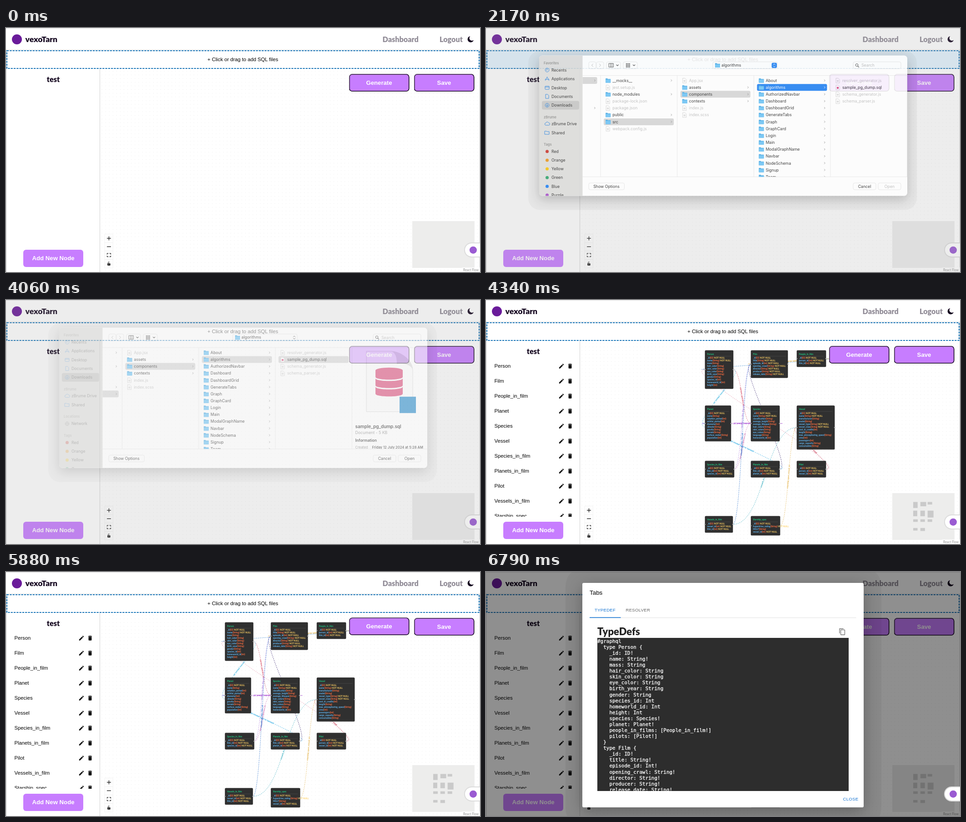
Recreate the animation shown at these times as an HTML page. Size 1043x537 px, loop 8 s.

```html
<!DOCTYPE html>
<html lang="en">
<head>
<meta charset="utf-8">
<title>Schema editor</title>
<style>
html, body { margin: 0; width: 100%; height: 100%; overflow: hidden; background: #fff; }
svg { display: block; width: 1043px; height: 537px; }
text { white-space: pre; }
.ui { font: 11.25px "Liberation Sans", Arial, sans-serif; }
.btn { font: bold 13.2px "Liberation Sans", Arial, sans-serif; fill: #fff; text-anchor: middle; }
.brand { font: 900 16.2px Lato, sans-serif; fill: #14061f; }
.mac { font: 8.75px Inter, sans-serif; fill: #2b2b2b; }
.head { font: 600 7.5px Inter, sans-serif; fill: #8f8f8d; }
.node { font: bold 4.86px Lato, sans-serif; }
.edge { fill: none; stroke-width: .9; stroke-dasharray: 2.03; }
.tab { font: 9.6px "Liberation Sans", Arial, sans-serif; letter-spacing: .27px; }
.code { font: 10.97px "DejaVu Sans Mono", monospace; fill: #fff; stroke: #fff; stroke-width: .3px; }
.line { fill: none; stroke-linecap: round; stroke-linejoin: round; }
.sheet { filter: drop-shadow(0 8px 12px rgba(0,0,0,.22)); }
.paper { filter: drop-shadow(0 9px 18px rgba(0,0,0,.28)); }
</style>
</head>
<body>
<svg id="stage" viewBox="0 0 1043 537"></svg>
<script>
const rect = (x, y, w, h, fill, rx = 0, more = '') =>
  `<rect x="${x}" y="${y}" width="${w}" height="${h}" rx="${rx}" fill="${fill}" ${more}/>`;
const text = (x, y, s, cls, more = '') => `<text x="${x}" y="${y}" class="${cls}" ${more}>${s}</text>`;
const path = (d, fill, more = '') => `<path d="${d}" fill="${fill}" ${more}/>`;
const line = (d, stroke, width = 1, more = '') =>
  `<path class="line" d="${d}" stroke="${stroke}" stroke-width="${width}" ${more}/>`;
const circle = (x, y, r, fill, more = '') => `<circle cx="${x}" cy="${y}" r="${r}" fill="${fill}" ${more}/>`;
const group = (id, body, more = '') => `<g id="${id}" ${more}>${body}</g>`;
const icon = (d, x, y, scale, fill = '#111') =>
  path(d, fill, `transform="translate(${x - 12 * scale} ${y - 12 * scale}) scale(${scale})"`);
const clip = (id, x, y, w, h, rx) => `<clipPath id="${id}">${rect(x, y, w, h, '#000', rx)}</clipPath>`;

const PURPLE = '#c77dff', INK = '#14061f';
const PENCIL = 'M3 17.25V21h3.75L17.8 9.95l-3.75-3.75zM20.7 7.05a1 1 0 0 0 0-1.4l-2.35-2.35a1 1 0 0 0-1.4 0l-1.85 1.85 3.75 3.75z';
const TRASH = 'M6 19a2 2 0 0 0 2 2h8a2 2 0 0 0 2-2V7H6zM19 4h-3.5l-1-1h-5l-1 1H5v2h14z';
const COPY = 'M16 1H4a2 2 0 0 0-2 2v14h2V3h12zM19 5H8a2 2 0 0 0-2 2v14a2 2 0 0 0 2 2h11a2 2 0 0 0 2-2V7a2 2 0 0 0-2-2zm0 16H8V7h11z';

// Tables: name, column, row, width, fields (# = Int, ! = NOT NULL)
const tables = [
  ['Person', 0, 0, 62, 'name! mass hair_color skin_color eye_color birth_year gender species_id# homeworld_id# height#'],
  ['Film', 1, 0, 81, 'title! episode_id#! opening_crawl! director! producer! release_date!'],
  ['People_in_film', 2, 0, 64, 'person_id#! film_id#!'],
  ['Planet', 0, 1, 57, 'name rotation_period# orbital_period# diameter# climate gravity terrain surface_water population#'],
  ['Species', 1, 1, 63, 'name! classification average_height average_lifespan hair_colors skin_colors eye_colors language homeworld_id#'],
  ['Vessel', 2, 1, 83, 'name! manufacturer model vessel_type! vessel_class! cost_in_credits# length max_atmosphering_speed crew# passengers# cargo_capacity consumables'],
  ['Species_in_film', 0, 2, 64, 'film_id#! species_id#!'],
  ['Planets_in_film', 1, 2, 63, 'film_id#! planet_id#!'],
  ['Pilot', 2, 2, 64, 'person_id#! vessel_id#!'],
  ['Vessels_in_film', 0, 3, 61, 'vessel_id#! film_id#!'],
  ['Starship_spec', 1, 3, 64, 'hyperdrive_rating! MGLT vessel_id#!']
].map(([name, col, row, w, list]) => {
  const fields = ('_id! ' + list).split(' ');
  return { name, fields, w, x: 482 + 101 * col, y: 111 + 121.6 * row, h: 18 + 6.02 * fields.length };
});

const links = [
  [0, 4, '#d9566b'], [0, 3, '#45b8e0'], [2, 0, '#3f8fd6'], [2, 1, '#e3b34c'], [4, 3, '#a23fd0'],
  [6, 1, '#b58be0'], [6, 4, '#d07bb8'], [7, 1, '#33206e'], [7, 3, '#3fb2e6'], [8, 0, '#e79ab0'],
  [8, 5, '#cc4a62'], [9, 1, '#3478d0'], [9, 5, '#45b3c4'], [10, 5, '#e6b95a']
];

function tableBox(n) {
  const rows = n.fields.map((f, i) => {
    const name = f.replace(/[#!]/g, '');
    const type = i ? (f.includes('#') ? 'Int' : 'String') : 'ID';
    const must = f.includes('!') ? '<tspan fill="#ffd166"> NOT NULL</tspan>' : '';
    return text(n.x + 4.5, n.y + 18 + 6.02 * i, `${name}<tspan fill="#ff7043">(${type})</tspan>${must}`, 'node', 'fill="#64b9f5"');
  }).join('');
  const mid = n.y + n.h / 2;
  const handle = x => circle(x, mid, 1.2, '#fff', 'stroke="#333" stroke-width=".5"');
  return rect(n.x, n.y, n.w, n.h, '#303030', 1.5, 'stroke="#1c1c1c" stroke-width=".6"') +
    text(n.x + 4.5, n.y + 9.6, n.name, 'node', 'fill="#20c782"') +
    line(`M${n.x + 4} ${n.y + 12.6}h${n.w - 9}`, '#555', .5) + rows + handle(n.x) + handle(n.x + n.w);
}

function edge([from, to, color], i) {
  const a = tables[from], b = tables[to];
  const x = a.x + a.w, y = a.y + a.h / 2, ty = b.y + b.h / 2, dx = b.x - x;
  const off = dx >= 0 ? dx / 2 : 3.98 * Math.sqrt(-dx);
  const label = a.name.toLowerCase() + '_' + b.name.toLowerCase() + '_id';
  return `<path id="edge${i}" class="edge" stroke="${color}" d="M${x} ${y}C${x + off} ${y} ${b.x - off} ${ty} ${b.x} ${ty}"/>` +
    `<text class="node" fill="${color}" text-anchor="middle" dy="1.5"><textPath href="#edge${i}" startOffset="50%">${label}</textPath></text>`;
}

const bigButton = (x, label) =>
  rect(x + .75, 102, 131, 37, PURPLE, 6, `stroke="${INK}" stroke-width="1.6"`) +
  line(`M${x + .75} 136V108a6 6 0 0 1 6-6h121`, '#5a4468', 1.4) + text(x + 66, 124.8, label, 'btn');

function page() {
  const list = tables.map((n, i) => {
    const y = 145 + 33 * i;
    return text(18.5, y + 4, n.name, 'ui') + icon(PENCIL, 166, y + .5, .58) + icon(TRASH, 185, y + .5, .58);
  }).join('');
  const map = tables.map(n =>
    rect(940 + (n.x - 482) * .157, 444.5 + (n.y - 111) * .157, n.w * .157, n.h * .157, '#cacaca')).join('');
  const controls = [0, 1, 2, 3].map(i => rect(217, 453.7 + 18.6 * i, 18.6, 18.6, '#fefefe', 0, 'stroke="#eee" stroke-width=".7"')).join('') +
    line('M222.5 462.8h8M226.5 458.8v8M222.5 481.3h8', '#111', 1.2) +
    line('M222.5 498v-2h2.5M228 496h2.5v2M230.5 501.5v2h-2.5M225 503.5h-2.5v-2', '#111', 1.1) +
    rect(223.3, 518, 6.2, 4.8, '#111', .8) + line('M224.7 518v-1.5a1.5 1.5 0 0 1 2.9-.6', '#111', 1) +
    circle(226.4, 520.4, .8, '#fff');
  return rect(0, 0, 1043, 537, '#fff') +
    rect(207, 91, 836, 446, 'url(#dots)') +
    line('M0 .5h1043M0 48h1043', '#dedede', 1.2) + line('M.7 48v489M206.5 91v446M1042.3 48v489', '#d8d8d8', 1.2) +
    circle(24, 25, 11, '#6a1b9a') + text(42.5, 31, 'vexoTarn', 'brand', 'style="font-size:17.6px"') +
    text(828.5, 30.5, 'Dashboard', 'brand', 'style="fill:#908b96"') + text(954, 30.5, 'Logout', 'brand', 'style="fill:#908b96"') +
    path('M1021.5 18A6.8 6.8 0 1 0 1029 26.5A5.6 5.6 0 0 1 1021.5 18Z', INK) +
    rect(1, 50, 1040, 40, '#e3f2fd', 0, 'id="hover"') +
    rect(2, 50, 1039, 39, 'none', 0, 'stroke="#1976b8" stroke-width="2" stroke-dasharray="4.2 2.1"') +
    text(521, 73, '+ Click or drag to add SQL files', 'ui', 'text-anchor="middle"') +
    text(104, 119, 'test', 'brand', 'text-anchor="middle"') +
    rect(38, 488, 132, 38, PURPLE, 6) + text(104, 511, 'Add New Node', 'btn') +
    rect(894, 425, 137, 103, '#ededec') +
    group('data', `<g clip-path="url(#listClip)">${list}</g>` + links.map(edge).join('') + tables.map(tableBox).join('') + map) +
    controls + group('generate', bigButton(755, 'Generate')) + bigButton(898, 'Save') +
    rect(1003, 527, 40, 10, '#fff', 0, 'opacity=".7"') + text(1006, 535, 'React Flow', 'node', 'style="font-weight:400;font-size:7px" fill="#888"');
}

const folder = (x, y) => path(`M${x} ${y - 4.5}h4l1 1.2h6v8.3h-11z`, '#3fa4e2') + rect(x, y - 2.2, 11, 7.2, '#6cc3f5', .8);
const sheetFile = (x, y, tint) => path(`M${x + 1} ${y - 5}h5l3 3v7.5h-8z`, '#fff', 'stroke="#bbb" stroke-width=".6"') +
  rect(x + 3, y - 1, 4, 4, tint, .8);
const chevron = (x, y, color = '#888') => line(`M${x} ${y - 1.8}l1.7 1.8l-1.7 1.8`, color, .9);

// File columns: a trailing slash marks a folder
const columns = [
  ['/', '', '', '', '/'],
  ['__mocks__/', 'jest.setup.js', 'node_modules/', 'package-lock.json', 'package.json', 'public/', 'src/', 'webpack.config.js'],
  ['App.jsx', 'assets/', 'components/', 'contexts/', 'index.js', 'index.scss'],
  'About algorithms AuthorizedNavbar Dashboard DashboardGrid GenerateTabs Graph GraphCard Login Main ModalGraphName Navbar NodeSchema Signup Team'.split(' ').map(s => s + '/'),
  ['resolver_generator.js', 'sample_pg_dump.sql', 'schema_generator.js', 'schema_parser.js']
];
const chosen = [0, 6, 2, 1, 1];

function preview() {
  const band = y => path(`M813 ${y}c0 8 60 8 60 0v15.5c0 8-60 8-60 0z`, '#db4a78');
  return `<g transform="translate(165.3)">` +
    path('M793 126h55c25 2 47 22 47 42v91h-102z', '#fdfdfd', 'stroke="#ccc" stroke-width=".8"') +
    path('M848 126c9 4 12 12 12 28c14-2 28 0 35 12c-2-20-25-40-47-40z', '#dedede') +
    '<ellipse cx="843" cy="168" rx="30" ry="6" fill="#db4a78"/>' + band(167) + band(185.5) + band(204) +
    rect(866, 226, 36, 36, '#2489ca') +
    text(768.5, 295, 'sample_pg_dump.sql', 'mac', 'style="font-size:9.9px;font-weight:600"') +
    text(768.5, 308.6, 'Document - 5 KB', 'mac', 'style="fill:#8a8a8a"') +
    text(768.5, 325, 'Information', 'mac', 'style="font-weight:600;font-size:8.5px"') +
    text(768.5, 340.3, 'Created', 'mac', 'style="fill:#8a8a8a;font-size:7.4px"') +
    text(805.5, 340.3, 'Friday 12 July 2024 at 5:28 AM', 'mac', 'style="font-weight:500;font-size:7.6px"') + '</g>';
}

// state 0: browsing, 1: file picked, 2: window inactive
function columnView(state) {
  const blue = state ? '#0b60dd' : '#1f80f2';
  return columns.map((names, k) => {
    const x = 83.6 + 168.6 * k;
    return names.map((name, i) => {
      if (!name) return '';
      const y = 129 + 15.15 * i, dir = name.endsWith('/'), sql = name.endsWith('.sql');
      const picked = chosen[k] === i && (k < 4 || state > 0);
      const active = picked && k > 2 && state < 2;
      const color = active ? '#fff' : dir || sql ? '#2b2b2b' : '#bdbdbd';
      return (picked ? rect(x + 7, y - 7.5, 154, 15, active ? blue : '#d6d6d6', 3) : '') +
        (dir ? folder(x + 11, y) + chevron(x + 155, y, active ? '#fff' : '#888') : sheetFile(x + 11, y, sql ? '#db4a78' : '#ddd')) +
        text(x + 26, y + 3.2, name.replace('/', ''), 'mac', `style="fill:${color}"`);
    }).join('') + line(`M${x + 168.6} 118v223`, '#e2e2e2', .8);
  }).join('') + (state ? preview() : '');
}

const pill = (x, y, w, h, fill = '#fff') => rect(x, y, w, h, fill, 3.5, 'stroke="#dcdcdc" stroke-width=".7"');
const centered = (x, s, color) => text(x, 365.2, s, 'mac', `text-anchor="middle" style="fill:${color}"`);

function controlsFor(state) {
  const live = state < 2;
  return rect(628.5, 90, 11.5, 11.5, live ? '#1f80f2' : '#fff', 3) +
    line('M632.3 94.3l2-2l2 2M632.3 97.3l2 2l2-2', live ? '#fff' : '#444', 1) +
    pill(863, 354.5, 50, 15, state === 1 ? '#1f80f2' : '#fff') +
    centered(888, 'Open', ['#bbb', '#fff', '#2b2b2b'][state]);
}

function sidebar() {
  const B = '#2e86de';
  const marks = [
    y => circle(134.5, y, 4.2, 'none', `stroke="${B}"`) + line(`M134.5 ${y - 2.5}v2.7h-2`, B),
    y => line(`M130.5 ${y + 3.5}l4-8l4 8M130 ${y + 1}h9`, B),
    y => rect(130, y - 3.5, 9, 7, 'none', 1, `stroke="${B}"`) + line(`M130 ${y - 1.5}h9`, B),
    y => line(`M131.5 ${y - 4.5}h4l2.5 2.5v6.5h-6.5z`, B),
    y => circle(134.5, y, 4.2, 'none', `stroke="${B}"`) + line(`M134.5 ${y - 2.2}v4.2M132.8 ${y + .5}l1.7 1.7l1.7-1.7`, B),
    y => line(`M132 ${y + 3}a2.5 2.5 0 0 1-.3-5a3.2 3.2 0 0 1 6-.3a2.6 2.6 0 0 1 .3 5.3z`, B),
    y => line(`M129.5 ${y - 3.5}h3.5l1 1h5v6h-9.5z`, B),
    y => circle(134.5, y, 4.2, 'none', 'stroke="#777" stroke-width=".8"') + line(`M130.3 ${y}h8.4M134.5 ${y - 4}c-2.5 2.5-2.5 5.5 0 8c2.5-2.5 2.5-5.5 0-8`, '#777', .7)
  ];
  const item = (y, s, mark) => mark(y) + text(144, y + 3.2, s, 'mac');
  const tags = [['Red', '#c8372d'], ['Orange', '#e8951d'], ['Yellow', '#f4c20d'], ['Green', '#2fa36b'], ['Blue', '#1f80f2'], ['Purple', '#a550c8']];
  const fixed = [[106, 'Recents'], [125.5, 'Applications'], [145, 'Desktop'], [164, 'Documents'], [183.5, 'Downloads'], [224.5, 'zBrume Drive'], [244, 'Shared']];
  return rect(117, 74, 95.5, 309, '#dcdcda') + rect(123, 174, 82, 19, '#c6c6c4', 3.5) +
    group('places', text(127, 93.7, 'Favorites', 'head') + text(127, 212, 'zBrume', 'head') +
      fixed.map(([y, s], i) => item(y, s, marks[i])).join('') +
      group('locations', text(127, 272.7, 'Locations', 'head') + item(285.5, 'Network', marks[7])) +
      group('tags', text(127, 314, 'Tags', 'head') +
        tags.map(([s, c], i) => item(327 + 19.2 * i, s, y => circle(134.5, y, 3.5, c))).join('')));
}

function dialog() {
  const grid = [0, 3.3, 6.6].map(dx => [0, 3.3, 6.6].map(dy => rect(308 + dx, 91.3 + dy, 2.3, 2.3, '#555')).join('')).join('');
  return rect(93, 64, 855, 350, '#000', 26, 'opacity=".04"') + rect(117, 74, 810, 309, '#fff', 7, 'class="sheet"') +
    '<g clip-path="url(#sheetClip)">' + sidebar() +
    pill(226, 88, 16, 15) + pill(243, 88, 16, 15) + pill(265, 88, 31, 15) + pill(302, 88, 31, 15) + pill(499, 88, 142, 15) + pill(808, 88, 105, 15) +
    line('M235.5 92.5l-3 3l3 3M249.5 92.5l3 3l-3 3', '#b5b5b5', 1) +
    line('M270.5 91.5h10v8h-10zM273.8 91.5v8M277.2 91.5v8', '#444', .9) + grid +
    line('M287 94.5l2.2 2.2l2.2-2.2M323.5 94.5l2.2 2.2l2.2-2.2', '#444', 1.1) +
    folder(504, 95.5) + text(518, 98.7, 'algorithms', 'mac') +
    circle(816, 95, 2.8, 'none', 'stroke="#444"') + line('M818 97.2l2.6 2.6', '#444', 1.1) +
    text(826, 98.8, 'Search', 'mac', 'style="fill:#b8b8b8"') +
    line('M212.5 118h715M212.5 341h715', '#e4e4e4', .8) +
    '<g clip-path="url(#columnClip)">' + group('strip', [0, 1, 2].map(s => group('cols' + s, columnView(s))).join('')) + '</g>' +
    pill(226, 354.5, 78.5, 15) + pill(808, 354.5, 50, 15) + centered(265, 'Show Options', '#2b2b2b') + centered(833, 'Cancel', '#2b2b2b') +
    [0, 1, 2].map(s => group('controls' + s, controlsFor(s))).join('') + '</g>';
}

function modal() {
  const code = `#graphql
  type Person {
    _id: ID!
    name: String!
    mass: String
    hair_color: String
    skin_color: String
    eye_color: String
    birth_year: String
    gender: String
    species_id: Int
    homeworld_id: Int
    height: Int
    species: Species!
    planet: Planet!
    people_in_films: [People_in_film!]
    pilots: [Pilot!]
  }
  type Film {
    _id: ID!
    title: String!
    episode_id: Int!
    opening_crawl: String!
    director: String!
    producer: String!
    release_date: String!`.split('\n');
  return rect(0, 0, 1043, 537, '#000', 0, 'opacity=".44"') +
    rect(175, -10, 695, 570, '#000', 40, 'opacity=".04"') +
    rect(212, 24, 619, 494, '#fff', 3, 'class="paper"') +
    text(228, 49.5, 'Tabs', 'ui', 'style="font-size:13.4px"') +
    text(239, 87, 'TYPEDEF', 'tab', 'fill="#1976d2"') + text(307.5, 87, 'RESOLVER', 'tab', 'fill="#666"') +
    line('M228 100.7h586', '#e0e0e0', 1) + rect(228, 99.5, 68.5, 1.6, '#1976d2') +
    text(245, 139.2, 'TypeDefs', 'brand', 'style="font-size:22px;fill:#222"') + icon(COPY, 784, 131.5, .68, '#777') +
    rect(245, 145, 553, 337, '#2d2d2d') +
    '<g clip-path="url(#codeClip)">' + code.map((s, i) => text(245, 155.8 + 13.08 * i, s, 'code')).join('') + '</g>' +
    text(785.5, 503.3, 'CLOSE', 'tab', 'fill="#1976d2"');
}

const badge = rect(1009, 473, 60, 31, '#fff', 15.5, 'stroke="#dcdcdc" stroke-width="2"') + circle(1028, 488.7, 8, '#9a5bd2');

document.getElementById('stage').innerHTML = '<defs>' +
  `<pattern id="dots" x="207" y="91" width="8.1" height="8.1" patternUnits="userSpaceOnUse">${circle(4, 4, .5, '#dcdcdc')}</pattern>` +
  clip('listClip', 0, 91, 206, 386) + clip('sheetClip', 117, 74, 810, 309, 7) +
  clip('columnClip', 212.5, 118, 714.5, 223) + clip('codeClip', 245, 145, 553, 337) + '</defs>' +
  page() + group('lowBadge', badge) + rect(0, 0, 1043, 537, '#9b9b9b', 0, 'id="veil"') +
  group('dialog', dialog()) + group('modal', modal()) + group('topBadge', badge);

const el = id => document.getElementById(id);
const show = (id, on) => { el(id).style.display = on ? '' : 'none'; };
const fade = (id, v) => { show(id, v > 0); el(id).setAttribute('opacity', v); };
const move = (id, x, y) => el(id).setAttribute('transform', `translate(${x} ${y})`);
const ramp = (t, from, span) => Math.min(1, Math.max(0, (t - from) / span));
const ease = p => p * p * (3 - 2 * p);
const edges = document.querySelectorAll('.edge');

function draw(t) {
  fade('hover', ramp(t, 1120, 350) * (1 - ramp(t, 2170, 210)));

  const open = ramp(t, 2100, 280), shut = ramp(t, 3850, 350);
  const state = t < 3010 ? 0 : t < 3850 ? 1 : 2;
  fade('veil', .45 * open ** .66 * (1 - shut));
  fade('dialog', Math.min(1, open * 3.5) * (1 - shut ** 1.6));
  fade('places', 1 - shut);
  move('dialog', 0, -24 * (1 - open) ** 2 - 22 * shut);
  for (let s = 0; s < 3; s++) {
    show('cols' + s, s === state);
    show('controls' + s, s === state);
  }
  move('strip', -165.3 * ease(ramp(t, 2940, 420)), 0);
  show('locations', t >= 2310);
  move('tags', 0, t < 2310 ? -41.8 : 0);

  show('data', t >= 4340);
  move('generate', 0, t >= 4620 && t < 6370 ? -.7 : 0);
  edges.forEach(e => { e.style.strokeDashoffset = -4.06 * t / 500; });

  const shown = ease(ramp(t, 6300, 280));
  fade('modal', shown);
  fade('topBadge', shown);
}

let start;
function tick(now) {
  start ??= now;
  const t = (now - start) % 8000;
  draw(Math.min(6790, Math.floor(t / 70) * 70));
  requestAnimationFrame(tick);
}
draw(0);
requestAnimationFrame(tick);
</script>
</body>
</html>
```
